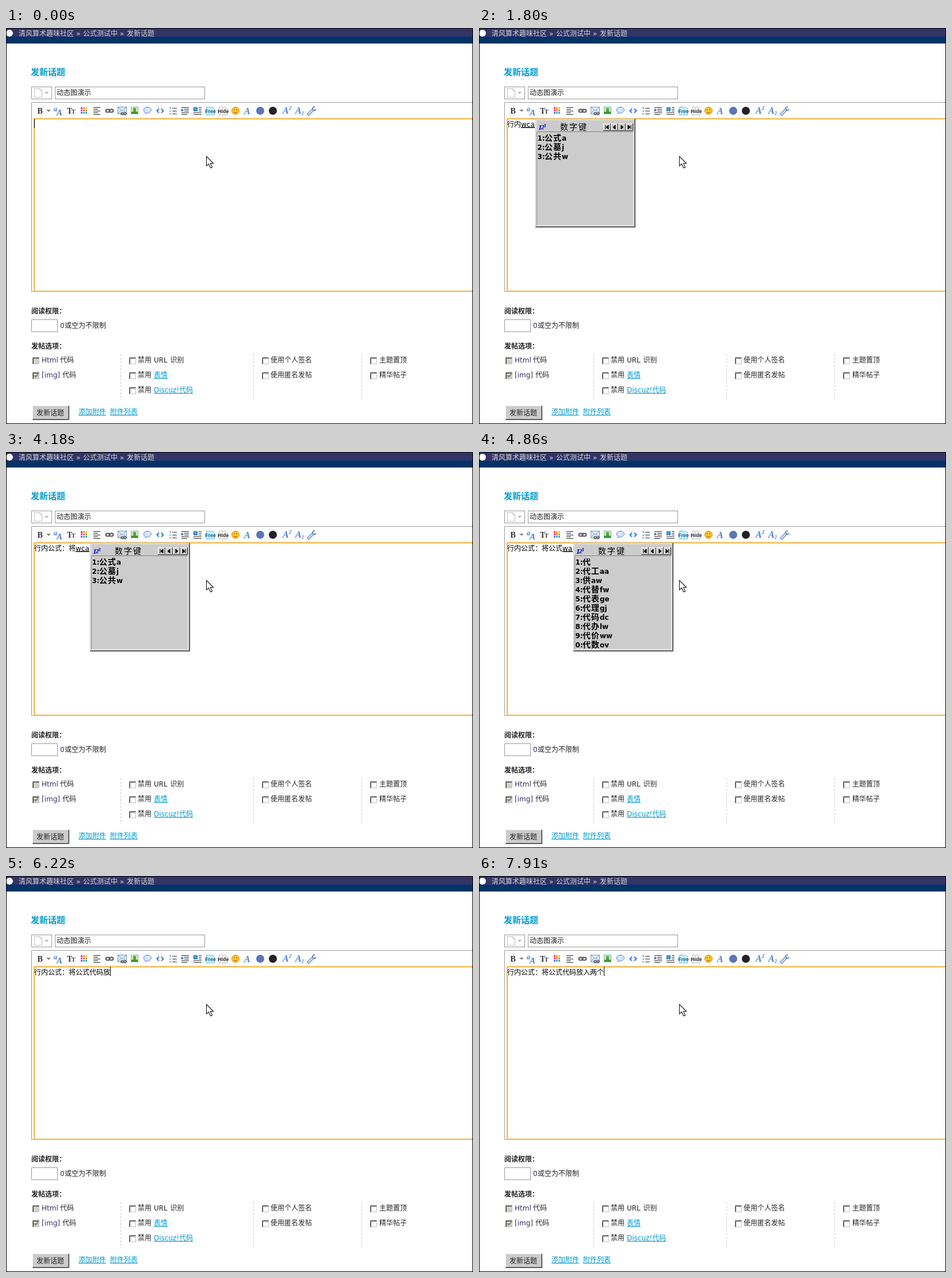
An HTML page that plays this animation: 812 by 689 pixels, repeating every 8000 ms.

```html
<!DOCTYPE html>
<html lang="zh-CN">
<head>
<meta charset="utf-8">
<title>发新话题</title>
<style>
html, body { margin: 0; width: 100%; height: 100%; overflow: hidden; background: #fff; }
svg { display: block; width: 812px; height: 689px; }
text { font: 12px "DejaVu Sans", "Noto Sans CJK SC", "Noto Sans CJK", sans-serif; fill: #222; white-space: pre; }
.bar text { fill: #d4d4dc; }
.head { font-size: 15px; font-weight: bold; fill: #09c; }
.bold { font-weight: bold; }
.link text { fill: #09c; text-decoration: underline; }
.tint { fill: #333366; }
.serif { font: bold 14px "Liberation Serif", serif; fill: #333; }
.blue { font: italic bold 16px "Liberation Serif", serif; fill: #4a7fc8; }
.tag { font: bold 9px "Liberation Sans", sans-serif; fill: #333; }
.field { fill: #fff; stroke: #999; }
.typed { fill: #000; }
.colon { font-family: "Noto Sans CJK TC", "Noto Sans CJK", sans-serif; }
.title { font-size: 14px; letter-spacing: 2px; fill: #000; }
.num { font-weight: bold; fill: #000; }
.word { font: bold 14px "Noto Sans CJK SC", "Noto Sans CJK", sans-serif; letter-spacing: 1px; fill: #000; }
.icon { font: italic bold 13px "Liberation Serif", serif; fill: #00c; }
</style>
</head>
<body>
<svg viewBox="0 0 812 689" xmlns="http://www.w3.org/2000/svg">
  <defs>
    <g id="box" fill="none">
      <path d="M.5 12V.5H12" stroke="#808080"/>
      <path d="M1.5 11V1.5H11" stroke="#404040"/>
      <path d="M1 11.5H11.5V1" stroke="#c4c0b8"/>
    </g>
  </defs>
  <rect width="812" height="689" fill="#fff"/>

  <g class="bar">
    <rect width="812" height="15" fill="#336"/>
    <rect y="15" width="812" height="12" fill="#036"/>
    <circle cx="6" cy="9" r="6" fill="#fff"/>
    <text x="22" y="14">清风算术趣味社区</text><text x="122" y="14">»</text>
    <text x="134" y="14">公式测试中</text><text x="198" y="14">»</text>
    <text x="210" y="14">发新话题</text>
  </g>

  <text class="head" x="43" y="82">发新话题</text>
  <rect class="field" x="44.5" y="102.5" width="35" height="21"/>
  <path d="M49.5 105.5H59L62.5 109V120.5H49.5ZM59 105.5V109H62.5" fill="#fff" stroke="#bbb"/>
  <path d="M67 111H74L70.5 115Z" fill="#bbb"/>
  <rect class="field" x="85.5" y="102.5" width="260" height="21"/>
  <text x="88" y="117">动态图演示</text>

  <path d="M812 129.5H44.5V458.5H48" fill="none" stroke="#999"/>
  <g id="tools">
    <text class="serif" x="54.5" y="149">B</text>
    <path d="M70 142H78L74 146Z" fill="#888"/>
    <text class="blue" x="83" y="145" style="font-size:12px">a</text>
    <text class="blue" x="88" y="152" style="font-size:15px">A</text>
    <text class="serif" x="106" y="149">T</text>
    <text class="serif" x="114" y="149" style="font-size:10px">T</text>
    <g id="swatch"></g>
    <path d="M152 138.5H164M152 141.5H160M152 144.5H164M152 147.5H160M152 150.5H164" stroke="#222"/>
    <g fill="none" stroke="#555" stroke-width="2"><ellipse cx="177" cy="144" rx="3.5" ry="2.5"/><ellipse cx="183" cy="144" rx="3.5" ry="2.5"/></g>
    <rect x="194.5" y="137.5" width="15" height="12" fill="#dcecfb" stroke="#7a9cc4"/>
    <path d="M195 138L202 144L209 138M195 149L200 143M209 149L204 143" fill="none" stroke="#7a9cc4"/>
    <g fill="none" stroke="#555" stroke-width="1.5"><circle cx="202" cy="149" r="2"/><circle cx="207" cy="149" r="2"/></g>
    <rect x="217.5" y="137.5" width="12" height="12" fill="#d9f2d0" stroke="#7ab"/>
    <path d="M218 149V146Q224 143 229 146V149Z" fill="#3b9a2b"/>
    <circle cx="223.5" cy="142" r="3" fill="#4caf2f"/><rect x="223" y="144" width="1.5" height="3" fill="#864"/>
    <path d="M242 149L242 147C238 145 238 138 246 137.5C254 138 255 146 247 147.5Z" fill="#d3e5fa" stroke="#5b86c4"/>
    <path d="M266 140.5L262.5 144L266 147.5M270 140.5L273.5 144L270 147.5" fill="none" stroke="#2a78dd" stroke-width="2"/>
    <path d="M289 139.5H297M289 144.5H297M289 149.5H297" stroke="#333"/>
    <path d="M285.5 137V141M284 144.5H287M284 149.5H287" stroke="#36a"/>
    <path d="M305 138.5H318M310 141.5H318M310 144.5H318M305 147.5H318M305 150.5H315" stroke="#222"/>
    <path d="M305 140L309 143L305 146Z" fill="#36c"/>
    <rect x="326.5" y="138.5" width="6" height="6" fill="#48a0e0" stroke="#36a"/>
    <path d="M335 138.5H340M335 141.5H340M335 144.5H340M326 147.5H340M326 150.5H340" stroke="#333"/>
    <path d="M348.5 137.5H359L362.5 141V151.5H348.5Z" fill="#c9ecfa" stroke="#7bc4e4"/>
    <text class="tag" x="346" y="148" style="fill:#16648c">Free</text>
    <path d="M370.5 137.5H381L384.5 141V151.5H370.5Z" fill="#f4f4f4" stroke="#bbb"/>
    <text class="tag" x="368" y="148">Hide</text>
    <circle cx="399" cy="144" r="6.5" fill="#ffc72e" stroke="#dc8a10"/>
    <path d="M396.5 141V143M401.5 141V143M395.5 146Q399 149.5 402.5 146" fill="none" stroke="#8a4a00"/>
    <text class="blue" x="414" y="150">A</text>
    <circle cx="442" cy="144" r="7" fill="#5a76b8"/>
    <circle cx="464" cy="144" r="7" fill="#222"/>
    <text class="blue" x="481" y="149">A</text><text class="blue" x="492" y="142" style="font-size:9px">2</text>
    <text class="blue" x="503" y="149">A</text><text class="blue" x="514" y="151" style="font-size:8px">2</text>
    <path d="M526 150L533 143" stroke="#5078b0" stroke-width="5" stroke-linecap="round"/>
    <path d="M526 150L533 143" stroke="#cfe0f5" stroke-width="3" stroke-linecap="round"/>
    <path d="M537 137.5A3 3 0 1 0 539 141" fill="none" stroke="#6a88b0" stroke-width="2"/>
  </g>
  <path d="M812 158H49V458H812" fill="none" stroke="#f3b23e" stroke-width="2"/>

  <text class="bold" x="44" y="497">阅读权限：</text>
  <rect class="field" x="44.5" y="507.5" width="45" height="21"/>
  <text class="tint" x="94" y="522">0</text><text x="102" y="522">或空为不限制</text>
  <text class="bold" x="44" y="558">发帖选项：</text>
  <path d="M199.5 568V647M430.5 568V647M618.5 568V647" stroke="#c4c4c4" stroke-dasharray="3 3"/>

  <g fill="#d4d0c8"><rect x="46" y="573" width="12" height="12"/><rect x="46" y="599" width="12" height="12"/></g>
  <path d="M49 604.5L51.5 607L56 602" fill="none" stroke="#808080" stroke-width="2"/>
  <g id="boxes"></g>
  <text class="tint" x="62" y="582">Html</text><text x="94" y="582">代码</text>
  <text class="tint" x="62" y="608">[img]</text><text x="98" y="608">代码</text>
  <text x="229" y="582">禁用</text><text x="257" y="582">URL</text><text x="285.5" y="582">识别</text>
  <text x="229" y="608">禁用</text><text x="229" y="634">禁用</text>
  <text x="460" y="582">使用个人签名</text><text x="460" y="608">使用匿名发帖</text>
  <text x="649" y="582">主题置顶</text><text x="649" y="608">精华帖子</text>
  <g class="link">
    <text x="257" y="608">表情</text><text x="257" y="634">Discuz!代码</text>
    <text x="126" y="672">添加附件</text><text x="181" y="672">附件列表</text>
  </g>
  <rect x="46" y="657" width="64" height="25" fill="#ccc"/>
  <path d="M46.5 681V657.5H109" fill="none" stroke="#eee"/>
  <path d="M46 681.5H109.5V657" fill="none" stroke="#333"/>
  <path d="M47 680.5H108.5V658" fill="none" stroke="#888"/>
  <text x="53" y="674">发新话题</text>

  <text class="typed" id="done" x="49" y="172"></text>
  <text class="typed" id="code" y="172"></text>
  <rect id="rule" y="172.5" height="1.5" fill="#000"/>
  <rect id="caret" y="158" width="1" height="16" fill="#000"/>

  <g id="popup">
    <rect width="174" height="189" fill="#ccc"/>
    <g fill="none">
      <path d="M.5 189V.5H174" stroke="#bbb"/>
      <path d="M1.5 187V1.5H172" stroke="#f4f4f4"/>
      <path d="M0 188.5H173.5V0" stroke="#404040"/>
      <path d="M1 187.5H172.5V1" stroke="#808080"/>
      <path d="M2.5 185V22.5H170" stroke="#808080"/>
      <path d="M3 185.5H170.5V23" stroke="#f4f4f4"/>
    </g>
    <text class="icon" x="5" y="19">1</text>
    <text class="icon" x="10" y="18" style="font-size:11px">2</text>
    <text class="icon" x="14" y="15" style="font-size:9px">3</text>
    <text class="title" x="43" y="19">数字键</text>
    <g id="keys"></g>
    <g id="list"></g>
  </g>

  <path d="M348.5 223.5V240L352.5 236.5L355.5 243.5L358.5 242.3L355.5 235.5H360.5Z" fill="#fff" stroke="#222" stroke-width="1.2"/>
  <rect x=".5" y=".5" width="811" height="688" fill="none" stroke="#000"/>
</svg>
<script>
const $ = id => document.getElementById(id);
const LOOP = 8000, LEFT = 49, EM = 12;
const LINE = '行内公式：将公式代码放入两个';

// [start ms, committed characters, pending code or "|" for a caret]
const steps = [
  [0, 0, '|'], [100, 0, ''], [420, 0, '|'], [780, 0, 't'], [1120, 1, 'm'],
  [1460, 2, 'w'], [1800, 2, 'wca'], [2140, 4, '|'], [2460, 5, '|'], [2800, 5, ''],
  [3500, 5, 'u'], [3840, 6, 'w'], [4180, 6, 'wca'], [4520, 8, '|'], [4860, 8, 'wa'],
  [5200, 10, '|'], [5540, 10, 'y'], [6220, 11, '|'], [6560, 11, 't'], [6900, 12, 'g'],
  [7220, 12, 'gmw'], [7560, 13, 'w'], [7910, 14, '|']
];
const widths = { t: 4, m: 10, w: 10, wca: 24, u: 7, wa: 18, y: 6, g: 7, gmw: 29 };
const words = {
  t: '和 长a 长工aaa 长期aad 长城afd 特区ftaq 升起afhn 长项aad 和蔼aay 千万gdn',
  m: '同 曲a 典aw 曲艺aan 贼ade 同工aaa 财贸agdm 同期aad 丹麦agmt 巍然aqd',
  w: '人 代a 代工aaa 人工aaa 代数aov 花期aad 人期aad 供应ayi 仓库aay 他们abw',
  wca: '公式a 公墓j 公共w',
  u: '产 并a 关于agf 总工aaa 减弱adx 前期aad 并列aagq 交期aad 产区aaq 着落aai',
  wa: '代 代工aa 供aw 代替fw 代表ge 代理gj 代码dc 代办lw 代价ww 代数ov',
  y: '主 度a 试aa 朗斯基行列式aaa 高草草原aad 文艺工作者aaf 试aag 诚aah 文艺节目aah 唐菖蒲aai',
  g: '一 开a 形式aaa 开工aaa 开幕式aaa 球茎甘蓝aaa 开花期aad 现营期aad 刑期aad 青花菜aae',
  gmw: '两w 两个h'
};

const label = (cls, x, y, s) => `<text class="${cls}" x="${x}" y="${y}">${s}</text>`;

function rows(code) {
  return words[code].split(' ').map((entry, i) => {
    const [, word, rest] = entry.match(/^([^a-z]+)(.*)$/);
    const y = 38 + i * 16;
    return label('num', 3.5, y, (i + 1) % 10 + ':') + label('word', 16, y, word) +
      label('num', 16 + word.length * 15, y, rest);
  }).join('');
}

$('boxes').innerHTML = [[46, 2], [214, 3], [445, 2], [633, 2]].map(([x, n]) =>
  [0, 1, 2].slice(0, n).map(r => `<use href="#box" x="${x}" y="${573 + r * 26}"/>`).join('')).join('');

$('swatch').innerHTML = ['#e33', '#f80', '#fb3', '#c4c', '#f66', '#7b3', '#66d', '#3ae', '#3b6'].map((c, i) =>
  `<rect x="${130 + i % 3 * 4}" y="${138 + (i / 3 | 0) * 4}" width="3" height="3" fill="${c}"/>`).join('');

$('keys').innerHTML = ['M4 3V10M9 3V10L5 6.5Z', 'M8 3V10L4 6.5Z', 'M5 3V10L9 6.5Z', 'M9 3V10M4 3V10L8 6.5Z'].map((d, i) =>
  `<g transform="translate(${118 + i * 13} 8)"><rect width="13" height="13" fill="#ccc"/>
  <path d="M.5 12V.5H12" fill="none" stroke="#fff"/><path d="M0 12.5H12.5V0" fill="none" stroke="#222"/>
  <path d="${d}" stroke="#000"/></g>`).join('');

let shown;
function draw([, count, code]) {
  const start = LEFT + count * EM;
  const caret = code === '|';
  const pending = caret ? '' : code;
  const width = widths[pending] || 0;
  $('done').innerHTML = LINE.slice(0, count).replace('：', '<tspan class="colon">：</tspan>');
  $('code').textContent = pending;
  $('code').setAttribute('x', start);
  $('rule').setAttribute('x', start);
  $('rule').setAttribute('width', width);
  $('caret').setAttribute('x', start);
  $('caret').setAttribute('visibility', caret ? 'visible' : 'hidden');
  $('popup').setAttribute('visibility', pending ? 'visible' : 'hidden');
  $('popup').setAttribute('transform', `translate(${start + width + 1} 158)`);
  $('list').innerHTML = pending ? rows(pending) : '';
}

function tick() {
  const t = performance.now() % LOOP;
  const step = steps.filter(s => s[0] <= t).pop();
  if (step !== shown) draw(shown = step);
  requestAnimationFrame(tick);
}
tick();
</script>
</body>
</html>
```
